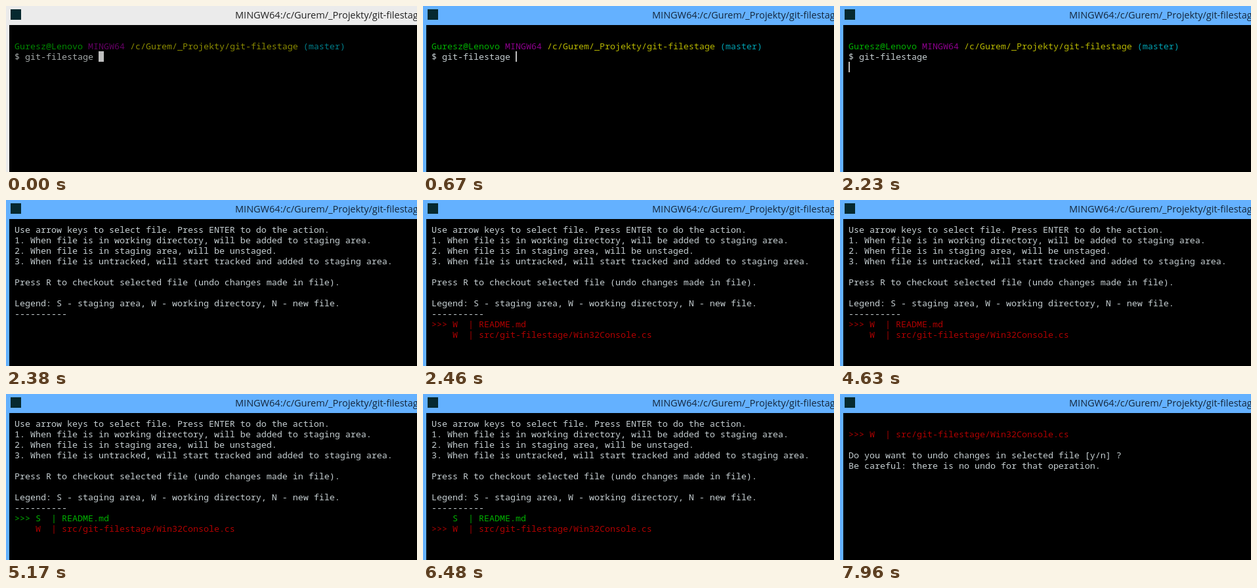
Write an HTML page that moves like this. It is 626x253 px and loops after 8000 ms.

```html
<!DOCTYPE html>
<html lang="en">
<head>
<meta charset="utf-8">
<title>Terminal</title>
<style>
  html, body { margin: 0; width: 100%; height: 100%; overflow: hidden; }
  svg { display: block; width: 626px; height: 253px; }
  text { white-space: pre; }
  .title { font: 14.5px "Open Sans", sans-serif; }
  .term { font: calc(40px / 3) "Noto Sans Mono", monospace; font-variant-ligatures: none; }

  .active { --frame: #64b1ff; --title: #14263a; --fg: #c6cfd2; --green: #00b000;
            --magenta: #8c008c; --yellow: #b8b800; --cyan: #00a3b3; --red: #b00000; }
  .idle   { --frame: #ebebeb; --title: #222222; --fg: #a3a8a8; --green: #008600;
            --magenta: #620062; --yellow: #8a8a00; --cyan: #007c88; --red: #860000; }
</style>
</head>
<body>
<svg id="stage" class="idle" viewBox="0 0 626 253">
  <rect width="626" height="253" style="fill:var(--frame)"/>
  <rect x="7" y="5" width="16" height="16" fill="#06292f"/>
  <text class="title" x="349" y="19" style="fill:var(--title)">MINGW64:/c/Gurem/_Projekty/git-filestage</text>
  <rect x="5" y="29" width="621" height="224"/>
  <g id="screen" class="term"></g>
  <rect id="cursor" height="16" fill="#bfbfbf"/>
</svg>
<script>
const LOOP = 8000;
const LEFT = 13, TOP = 37, COL = 8, ROW = 16, BASELINE = 13;
const stage = document.getElementById('stage');
const screen = document.getElementById('screen');
const cursor = document.getElementById('cursor');

// A line is a list of [text, colour] runs; a screen is a list of lines.
const plain = text => [[text, 'fg']];

const prompt = [
  [],
  [['Guresz@Lenovo ', 'green'], ['MINGW64 ', 'magenta'],
   ['/c/Gurem/_Projekty/git-filestage ', 'yellow'], ['(master)', 'cyan']],
  plain('$ git-filestage'),
];

const help = [
  'Use arrow keys to select file. Press ENTER to do the action.',
  '1. When file is in working directory, will be added to staging area.',
  '2. When file is in staging area, will be unstaged.',
  '3. When file is untracked, will start tracked and added to staging area.',
  '',
  'Press R to checkout selected file (undo changes made in file).',
  '',
  'Legend: S - staging area, W - working directory, N - new file.',
  '-'.repeat(10),
].map(plain);

const fileLine = (name, status, selected) =>
  [[`${selected ? '>>>' : '   '} ${status}  | ${name}`, status === 'S' ? 'green' : 'red']];

const README = 'README.md', SOURCE = 'src/git-filestage/Win32Console.cs';

const fileList = (readmeStatus, selected) => [
  ...help,
  fileLine(README, readmeStatus, selected === 0),
  fileLine(SOURCE, 'W', selected === 1),
];

const confirmUndo = [
  [],
  fileLine(SOURCE, 'W', true),
  [],
  plain('Do you want to undo changes in selected file [y/n] ?'),
  plain('Be careful: there is no undo for that operation.'),
];

const block = { col: 16, row: 2, width: 8 };
const bar = { col: 16, row: 2, width: 2 };
const nextLine = { col: 0, row: 3, width: 2 };

const steps = [
  { at: 0, lines: prompt, caret: block, idle: true },
  { at: 670, lines: prompt, caret: bar },
  { at: 1220, lines: prompt },
  { at: 1770, lines: prompt, caret: bar },
  { at: 2230, lines: prompt, caret: nextLine },
  { at: 2380, lines: help },
  { at: 2460, lines: fileList('W', 0) },
  { at: 4000, lines: fileList('W', 1) },
  { at: 4630, lines: fileList('W', 0) },
  { at: 5090, lines: help },
  { at: 5170, lines: fileList('S', 0) },
  { at: 6480, lines: fileList('S', 1) },
  { at: 7960, lines: confirmUndo },
];

function svg(tag, attrs) {
  const node = document.createElementNS('http://www.w3.org/2000/svg', tag);
  for (const key in attrs) node.setAttribute(key, attrs[key]);
  return node;
}

function drawLine(runs, row) {
  const line = svg('text', { x: LEFT, y: TOP + row * ROW + BASELINE });
  for (const [text, colour] of runs) {
    const run = svg('tspan', { style: `fill:var(--${colour})` });
    run.textContent = text;
    line.append(run);
  }
  return line;
}

function draw({ lines, caret, idle }) {
  stage.setAttribute('class', idle ? 'idle' : 'active');
  screen.replaceChildren(...lines.map(drawLine));
  cursor.setAttribute('visibility', caret ? 'visible' : 'hidden');
  if (caret) {
    cursor.setAttribute('x', LEFT + caret.col * COL);
    cursor.setAttribute('y', TOP + caret.row * ROW);
    cursor.setAttribute('width', caret.width);
  }
}

const start = performance.now();
let shown;

function tick() {
  const time = (performance.now() - start) % LOOP;
  const step = steps.findLast(s => s.at <= time);
  if (step !== shown) draw(shown = step);
  requestAnimationFrame(tick);
}
tick();
</script>
</body>
</html>
```
